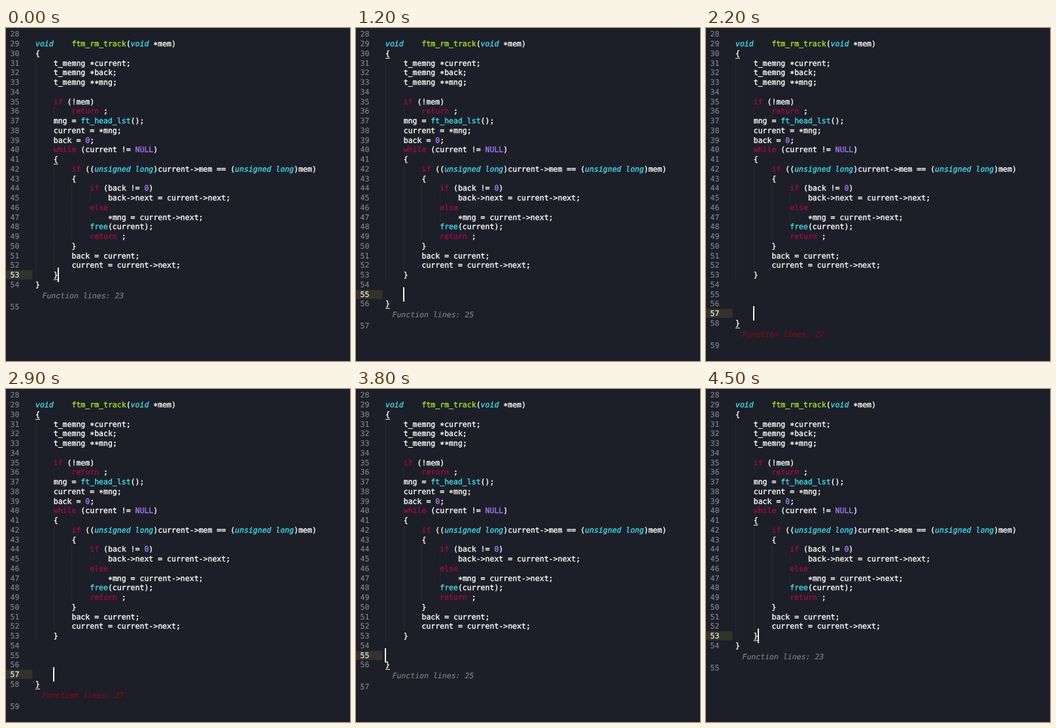
An HTML page for the animation above (5500 ms loop, 526 by 510 pixels).

```html
<!DOCTYPE html>
<html lang="en">
<head>
<meta charset="utf-8">
<style>
html, body { margin: 0; width: 100%; height: 100%; overflow: hidden; background: #1d1f28; }
svg { display: block; }
text {
  font: 11.52px "DejaVu Sans Mono", monospace; white-space: pre;
  text-rendering: geometricPrecision; color: #fafaf5; stroke-width: .15px;
}
text, tspan { fill: currentColor; stroke: currentColor; }
.code { stroke-width: .4px; }
.key { color: #b3054e; stroke-width: .2px; }
.type { color: #42d6ea; font-style: italic; }
.call { color: #42d6ea; }
.def { color: #a4e02c; }
.num { color: #a274f2; }
.star { baseline-shift: -1.5px; }
.line { color: #83858b; }
.note { color: #83858b; font-style: italic; }
.over { color: #8f0719; }
</style>
</head>
<body>
<svg id="stage" width="526" height="510"></svg>
<script>
const LEFT = 45, CHAR = 6.935, PITCH = 14.75, LOOP = 5500;

const code = `
void    ftm_rm_track(void *mem)
{
    t_memng *current;
    t_memng *back;
    t_memng **mng;

    if (!mem)
        return ;
    mng = ft_head_lst();
    current = *mng;
    back = 0;
    while (current != NULL)
    {
        if ((unsigned long)current->mem == (unsigned long)mem)
        {
            if (back != 0)
                back->next = current->next;
            else
                *mng = current->next;
            free(current);
            return ;
        }
        back = current;
        current = current->next;
    }`.split("\n");

// Start time, inserted lines, cursor column
const steps = [
  [0, 0, 5], [800, 1, 4], [1100, 2, 4], [1500, 3, 4], [2000, 4, 4],
  [3300, 4, 0], [3500, 3, 0], [3800, 2, 0], [4100, 1, 0], [4500, 0, 5]
];

const rules = [
  ["key", /^(if|while|return|else)$/],
  ["type", /^(void|unsigned|long)$/],
  ["call", /^(ft_head_lst|free)$/],
  ["def", /^ftm_rm_track$/],
  ["num", /^(0|NULL)$/],
  ["star", /^\*$/]
];

const middle = n => 24 + (n - 29) * PITCH;
const column = c => LEFT + c * CHAR;
const rect = (x, y, w, h, fill) =>
  `<rect x="${x}" y="${y}" width="${w}" height="${h}" fill="${fill}"/>`;
const text = (x, y, cls, s) => `<text x="${x}" y="${y + 4.2}" class="${cls}">${s}</text>`;
const underline = (n, c) => rect(column(c), Math.round(middle(n)) + 7, 7, 1, "#e4e4de");

const paint = s => s.replace(/\w+|\*/g, word => {
  const rule = rules.find(r => r[1].test(word));
  return rule ? `<tspan class="${rule[0]}">${word}</tspan>` : word;
});

function guide(col, from, to) {
  const x = Math.round(column(col)) + .5;
  return `<path d="M${x} ${middle(from) - 7}V${middle(to) + 7}" stroke="#343640" stroke-dasharray="1 1"/>`;
}

const guides = [[0, 31, 53], [4, 36, 36], [4, 42, 52], [8, 44, 49], [12, 45, 45], [12, 47, 47]]
  .map(g => guide(...g)).join("");
const body = code.map((s, i) => text(LEFT, middle(28 + i), "code", paint(s))).join("");

function draw([, extra, col]) {
  const row = 53 + extra, end = row + 1, y = middle(end), count = 23 + extra;
  let out = rect(0, Math.round(middle(row)) - 7, 40.5, 14, "#33322b") + guides + body;
  for (let n = 28; n <= end; n++)
    out += text(6.5, middle(n), n === row ? "" : "line", n);
  out += text(6.5, y + 34, "line", end + 1);
  out += text(LEFT, y, "code", "}");
  out += text(55.5, y + 17, count > 25 ? "note over" : "note", "Function lines: " + count);
  out += extra ? underline(30, 0) + underline(end, 0) : underline(41, 4) + underline(53, 4);
  out += rect(Math.round(column(col)) - 1, Math.round(middle(row)) - 11, 2, 22, "#f8f8f2");
  stage.innerHTML = out;
}

const stage = document.getElementById("stage");
let shown;
function tick() {
  const t = performance.now() % LOOP;
  const step = steps.findLast(s => s[0] <= t);
  if (step !== shown) draw(shown = step);
  requestAnimationFrame(tick);
}
tick();
</script>
</body>
</html>
```
